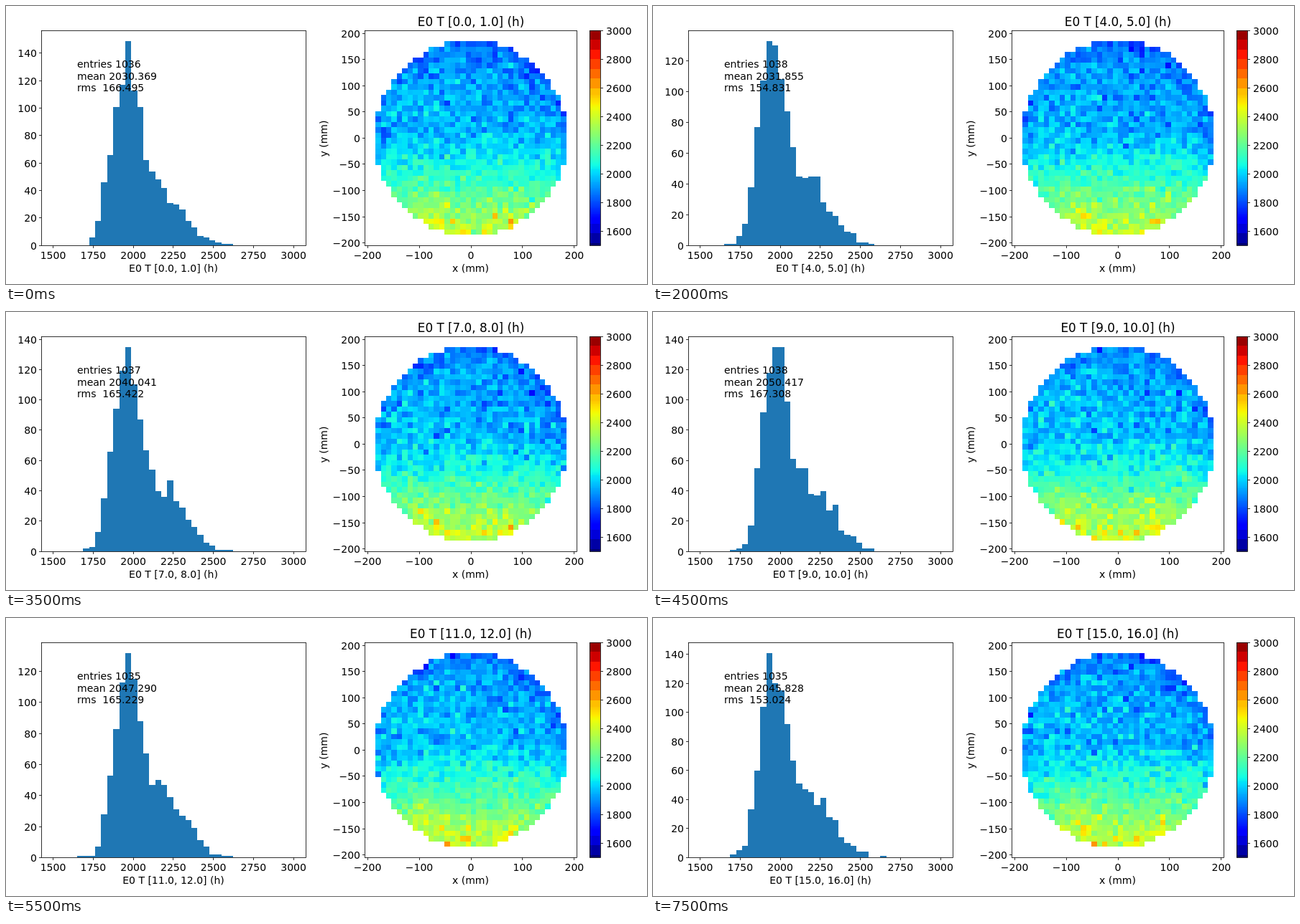
Animation of 892x388 px, one loop 8000 ms. Source, as an HTML page with a canvas:

```html
<!DOCTYPE html>
<html lang="en">
<head>
<meta charset="utf-8">
<title>Histogram and map over time</title>
<style>
html, body { margin: 0; width: 100%; height: 100%; overflow: hidden; background: #fff; }
canvas { display: block; }
</style>
</head>
<body>
<canvas id="stage" width="892" height="388"></canvas>
<script>
const ctx = document.getElementById('stage').getContext('2d');
const STEP = 500, COUNT = 16, BINS = 40, BIN_SIZE = 37.5;
const FONT = 'px "DejaVu Sans", sans-serif';

// Key readings: hour, entries, mean, rms, highest bar. Hours between are blended.
const KEYS = [
  [0, 1036, 2030.369, 166.495, 149],
  [2, 1040, 2040.263, 175.672, 140],
  [4, 1038, 2031.855, 154.831, 133],
  [7, 1037, 2040.041, 165.422, 135],
  [9, 1038, 2050.417, 167.308, 135],
  [11, 1035, 2047.29, 165.229, 132],
  [15, 1035, 2045.828, 153.024, 141]
];

function seeded(seed) {
  return () => {
    seed = (seed + 0x6D2B79F5) | 0;
    let t = Math.imul(seed ^ (seed >>> 15), 1 | seed);
    t = (t + Math.imul(t ^ (t >>> 7), 61 | t)) ^ t;
    return ((t ^ (t >>> 14)) >>> 0) / 4294967296;
  };
}
const bell = rnd => (rnd() + rnd() + rnd() + rnd() - 2) * 1.73;
const gauss = (x, mid, sigma) => Math.exp(-((x - mid) ** 2) / (2 * sigma * sigma));

function readings(h) {
  const next = KEYS.findIndex(k => k[0] >= h), b = KEYS[next];
  if (b[0] === h) return b;
  const a = KEYS[next - 1], t = (h - a[0]) / (b[0] - a[0]);
  return a.map((v, i) => v + (b[i] - v) * t);
}

// A main peak with a broad shoulder on its right, plus counting noise.
function countBins(h, mean, peak) {
  const rnd = seeded(h + 1), shift = (mean - 2040) / BIN_SIZE;
  const bins = Array.from({ length: BINS }, (_, k) => {
    const v = 120 * gauss(k, 11.6 + shift, 2.15) + 40 * gauss(k, 17.5 + shift, 4);
    return Math.max(0, Math.min(peak, Math.round(v + bell(rnd) * 0.7 * Math.sqrt(v))));
  });
  bins[bins.indexOf(Math.max(...bins))] = peak;
  return bins;
}

// Disc of cells, innermost first; each hour fills its first n.
const rnd = seeded(77), cells = [];
for (let y = -19.5; y < 20; y++)
  for (let x = -19.5; x < 20; x++)
    cells.push({ x, y, d: x * x + y * y, grain: bell(rnd) * 34 });
cells.sort((p, q) => p.d - q.d || q.y - p.y);

function level({ x, y, d, grain }) {
  const drop = Math.max(0, 2 - y) / 19, rise = Math.max(0, y - 4);
  const rim = (d / 328) ** 5 * (y > -7 ? 75 : 50);
  const spots = 80 * gauss(x, -8.5, 3) * gauss(y, -13.5, 3)
    + 130 * gauss(x, 7.5, 1.2) * gauss(y, -16, 1.2);
  return grain + 480 * drop ** 1.2 - 3.5 * rise - rim - (y > 0 ? 1.3 * x : 0) + spots;
}

// Cells ranked by level take the values counted in the histogram.
function colorCells(h, n, bins) {
  const rnd = seeded(500 + h), total = bins.reduce((s, c) => s + c, 0);
  const ranked = cells.slice(0, n)
    .map(c => ({ c, score: level(c) + bell(rnd) * 52 }))
    .sort((p, q) => p.score - q.score);
  let bin = 0, below = 0;
  return ranked.map(({ c }, k) => {
    const at = (k + 0.5) / n * total;
    while (at > below + bins[bin]) below += bins[bin++];
    return { x: c.x, y: c.y, color: jet((bin + (at - below) / bins[bin]) / BINS) };
  });
}

const hours = Array.from({ length: COUNT }, (_, h) => {
  const [, entries, mean, rms, top] = readings(h);
  const n = Math.round(entries), bins = countBins(h, mean, Math.round(top));
  return { n, mean, rms, bins, map: colorCells(h, n, bins) };
});

// Rainbow scale, with coarser bands at both ends.
function jet(v) {
  const band = v > 0.7 || v < 0.12 ? 0.045 : 0.006;
  v = 1 - (Math.floor((1 - v) / band) + 0.5) * band;
  const part = (up, down) => Math.round(255 * Math.max(0, Math.min(1, up, down)));
  const r = part((v - 0.35) / 0.31, 1 - (v - 0.89) / 0.22);
  const g = part((v - 0.125) / 0.25, (0.91 - v) / 0.27);
  const b = part(0.5 + v / 0.22, (0.65 - v) / 0.31);
  return `rgb(${r},${g},${b})`;
}

function rect(x0, y0, x1, y1, color) {
  const l = Math.round(x0), t = Math.round(y0);
  ctx.fillStyle = color;
  ctx.fillRect(l, t, Math.round(x1) - l, Math.round(y1) - t);
}
function text(s, x, y, align = 'center', size = 14) {
  ctx.font = size + FONT;
  ctx.textAlign = align;
  ctx.fillStyle = '#000';
  ctx.fillText(s, x, y);
}
function line(x0, y0, x1, y1) {
  ctx.beginPath();
  ctx.moveTo(x0, y0);
  ctx.lineTo(x1, y1);
  ctx.stroke();
}
const snap = v => Math.floor(v) + 0.5;
const label = v => String(v).replace('-', '\u2212');
function xTick(v, x) {
  line(snap(x), 334.5, snap(x), 338);
  text(label(v), x, 353);
}
function yTick(v, y, edge, side) {
  line(edge, snap(y), edge + side * 3.5, snap(y));
  text(label(v), edge + side * 7 + 0.5, Math.round(y + 5.5), side < 0 ? 'right' : 'left');
}
const frame = (x, w) => ctx.strokeRect(x, 34.5, w, 300);

function drawHistogram(hour, name) {
  const max = Math.max(...hour.bins) * 1.05;
  const px = v => 48.8 + (v - 1425) * 368 / 1650, py = c => 334.3 - c * 300 / max;
  hour.bins.forEach((c, k) => {
    if (c) rect(px(1500 + k * BIN_SIZE), py(c), px(1500 + (k + 1) * BIN_SIZE), 334, '#1f77b4');
  });
  frame(49.5, 368);
  for (let v = 1500; v <= 3000; v += 250) xTick(v, px(v));
  for (let c = 0; c <= max; c += 20) yTick(c, py(c), 49.5, -1);
  text(name, 233, 371);
  text('entries ' + hour.n, 99, 86, 'left');
  text('mean ' + hour.mean.toFixed(3), 99, 103, 'left');
  text('rms  ' + hour.rms.toFixed(3), 99, 119, 'left');
}

function drawMap(hour, name) {
  const px = x => 647 + x * 7.375, py = y => 184.4 - y * 7.5;
  for (const c of hour.map)
    rect(px(c.x - 0.5), py(c.y + 0.5), px(c.x + 0.5), py(c.y - 0.5), c.color);
  frame(499.5, 295);
  for (let v = -200; v <= 200; v += 100) xTick(v, px(v / 10.25));
  for (let v = -200; v <= 200; v += 50) yTick(v, py(v / 10.25), 499.5, -1);
  text(name, 647, 28, 'center', 16.8);
  text('x (mm)', 646.5, 371);
  ctx.save();
  ctx.translate(447, 185);
  ctx.rotate(-Math.PI / 2);
  text('y (mm)', 0, 0);
  ctx.restore();
}

function drawColorbar() {
  for (let y = 34; y < 334; y++) rect(812, y, 827, y + 1, jet((333.5 - y) / 300));
  frame(812.5, 15);
  for (let v = 1600; v <= 3000; v += 200) yTick(v, 334.5 - (v - 1500) / 5, 827.5, 1);
}

function draw(h) {
  const name = `E0 T [${h}.0, ${h + 1}.0] (h)`;
  rect(0, 0, 892, 388, '#fff');
  ctx.strokeStyle = '#000';
  ctx.lineWidth = 0.8;
  drawHistogram(hours[h], name);
  drawMap(hours[h], name);
  drawColorbar();
}

const start = performance.now();
let shown = -1;
function tick() {
  const h = Math.floor((performance.now() - start) / STEP) % COUNT;
  if (h !== shown) draw(shown = h);
  requestAnimationFrame(tick);
}
tick();
</script>
</body>
</html>
```
